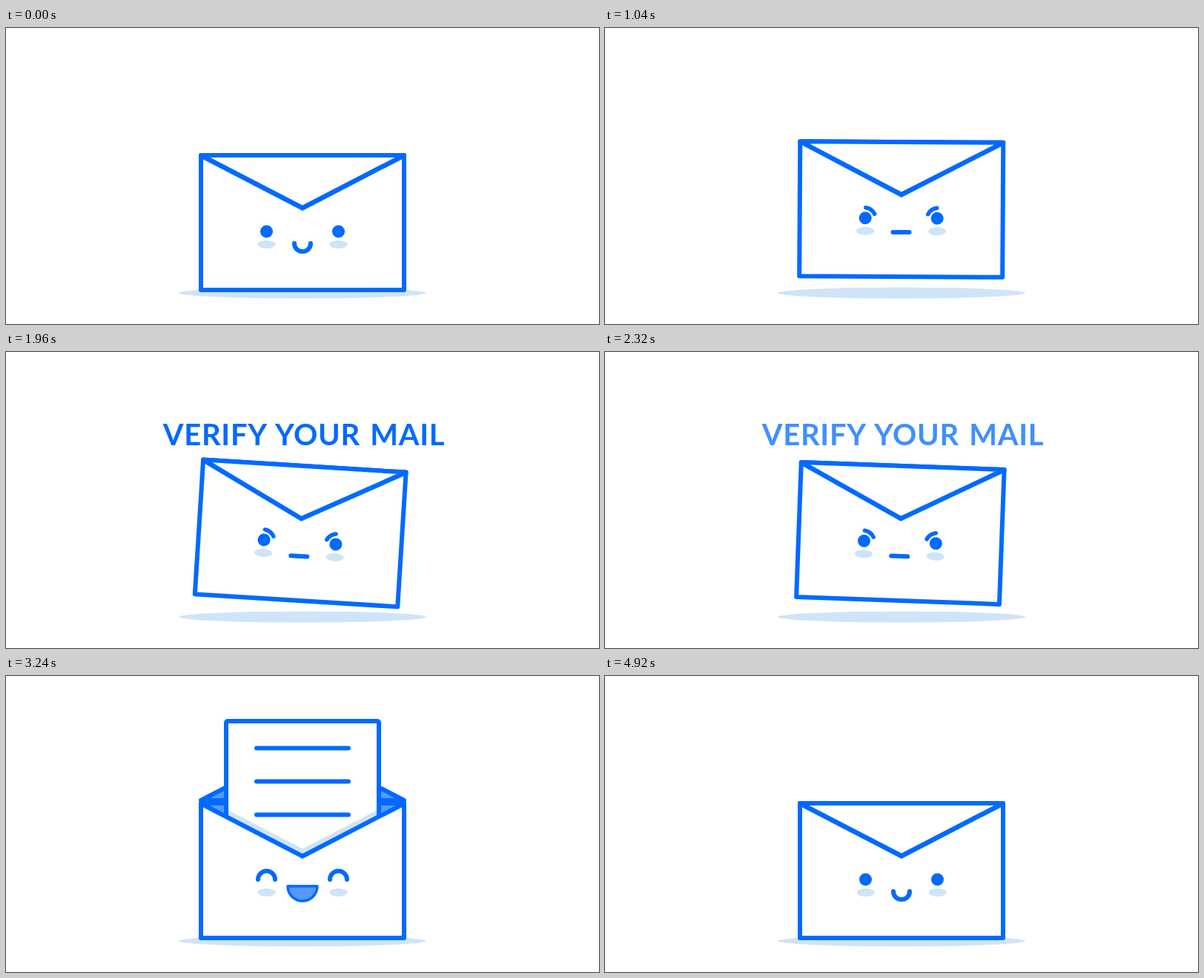
Write an HTML page that moves like this. It is 800x400 px and loops after 5 s.

```html
<!DOCTYPE html>
<html lang="en">
<head>
<meta charset="utf-8">
<title>Verify your mail</title>
<style>
  html, body { margin: 0; width: 100%; height: 100%; overflow: hidden; background: #fff; }
  svg { display: block; width: 800px; height: 400px; }
  .line { fill: none; stroke: #006aff; stroke-width: 6; stroke-linecap: round; stroke-linejoin: round; }
  .pale { fill: #d0e4f8; }
  .ink { fill: #006aff; }
  #title { font: 700 40px Lato, sans-serif; letter-spacing: .7px; word-spacing: 3px; text-anchor: middle; }
</style>
</head>
<body>
<svg viewBox="0 0 800 400">
  <defs>
    <clipPath id="pocket"><rect y="-100" width="800" height="440"/></clipPath>
    <clipPath id="sheet"><rect id="sheetArea" x="300" width="200" height="190"/></clipPath>
    <filter id="smear" x="-10%" y="-30%" width="120%" height="160%">
      <feGaussianBlur id="blur" stdDeviation="0 0"/>
    </filter>
  </defs>

  <ellipse class="pale" cx="400" cy="358" rx="167" ry="7.5"/>
  <text id="title" class="ink" x="402" y="126">VERIFY YOUR MAIL</text>

  <g id="mail">
    <path fill="#5599f8" d="M263 172H537L400 243Z"/>
    <path class="line" d="M263 172H537"/>
    <path id="flap" class="line"/>

    <g clip-path="url(#pocket)">
      <g id="letter">
        <rect class="line" style="fill:#fff" x="297" width="206" height="200" rx="2"/>
        <path class="line" d="M338 36.5H462M338 81.5H462M338 126.5H462"/>
      </g>
      <path clip-path="url(#sheet)" fill="none" stroke="#d0e4f8" stroke-width="17" d="M263 172L400 243L537 172"/>
    </g>

    <path fill="#fff" d="M263 172L400 243L537 172V354H263Z"/>
    <path class="line" d="M263 173V354H537V173"/>
    <path class="line" style="stroke-linejoin:miter" d="M264 173L400 243.5L536 173"/>

    <ellipse class="pale" cx="351.5" cy="292.5" rx="12" ry="5.5"/>
    <ellipse class="pale" cx="448.5" cy="292.5" rx="12" ry="5.5"/>
    <g id="plain">
      <circle class="ink" cx="351.5" cy="275" r="8.5"/>
      <circle class="ink" cx="448.5" cy="275" r="8.5"/>
      <path id="mouth" class="line"/>
    </g>
    <path id="brows" class="line" style="stroke-width:5.5" d="M352 261Q360 262 364 269.5M448 261Q440 262 436 269.5"/>
    <g id="happy">
      <path class="line" d="M340 275a11.5 11.5 0 0 1 23 0M437 275a11.5 11.5 0 0 1 23 0"/>
      <path class="line" style="fill:#5599f8;stroke-width:3.5" d="M380 284H420A20 20 0 0 1 380 284Z"/>
    </g>
  </g>
</svg>
<script>
const LOOP = 5000, TAU = Math.PI * 2;
const el = id => document.getElementById(id);
const set = (id, name, value) => el(id).setAttribute(name, value);
const linear = (t, a, b) => Math.min(1, Math.max(0, (t - a) / (b - a)));
const smooth = (t, a, b) => { const x = linear(t, a, b); return x * x * (3 - 2 * x); };

const letterTop = t =>
  250 - 189 * (Math.sin(linear(t, 2607, 2827) * TAU / 4) - smooth(t, 3960, 4280));

// Five and a half swings of the angry shake
const shake = t => t > 1037 && t < 2638 ? 4 * Math.sin(TAU * (t - 1037) / 291) : 0;

function draw(t) {
  const lift = 18 * (smooth(t, 780, 1040) - smooth(t, 2740, 3000));
  const angry = smooth(t, 800, 1000) - smooth(t, 2740, 2860);
  const happy = smooth(t, 2740, 2880) - smooth(t, 4200, 4360);
  const fold = 1 - 2 * (smooth(t, 2490, 2770) - smooth(t, 4200, 4480));

  set('title', 'opacity', linear(t, 1180, 1580) - linear(t, 2240, 2560));
  set('mail', 'transform', `rotate(${shake(t)} 400 200) translate(0 ${-lift})`);

  const hinge = 172 + 4 * Math.min(0, fold);
  set('flap', 'd', `M263 ${hinge}H537L400 ${hinge + 71 * fold}Z`);
  el('flap').style.fill = fold > 0 ? '#fff' : '#5599f8';

  const top = letterTop(t);
  const speed = Math.abs(letterTop(t + 20) - letterTop(t - 20));
  set('letter', 'transform', `translate(0 ${top})`);
  set('letter', 'filter', speed > 1 ? 'url(#smear)' : 'none');
  set('blur', 'stdDeviation', `0 ${speed * 0.1}`);
  set('sheetArea', 'y', top + 3);

  const y = 291 + 3 * angry, dip = y + 14.7 * (1 - angry);
  set('mouth', 'd', `M389 ${y}C389 ${dip} 411 ${dip} 411 ${y}`);
  set('brows', 'opacity', angry);
  set('plain', 'opacity', 1 - happy);
  set('happy', 'opacity', happy);
}

const start = performance.now();
function tick() {
  draw((performance.now() - start) % LOOP);
  requestAnimationFrame(tick);
}
tick();
</script>
</body>
</html>
```
